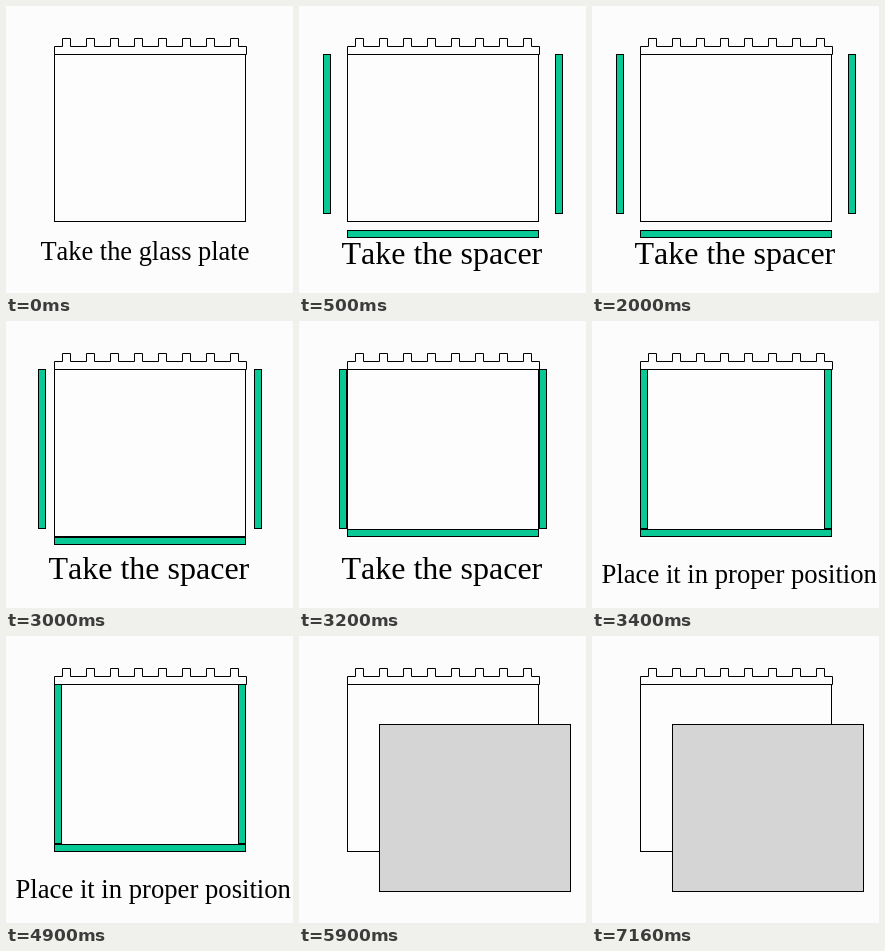
Animation of 287x287 px, one loop 8 s. Source, as an HTML page with a canvas:

```html
<!DOCTYPE html>
<html lang="en">
<head>
<meta charset="utf-8">
<title>Assembling the glass plates</title>
<style>
  html, body { margin: 0; width: 100%; height: 100%; overflow: hidden; background: #fcfcfc; }
  canvas { display: block; width: 287px; height: 287px; }
</style>
</head>
<body>
<canvas id="stage" width="287" height="287"></canvas>
<script>
const ctx = document.getElementById('stage').getContext('2d');
const LOOP = 8000;
const PAPER = '#fcfcfc', GLASS = '#fdfdfd', GREEN = '#08c896', GREY = '#d5d5d5';

const captions = {
  plate: { text: 'Take the glass plate', x: 34.5, y: 254, size: 26.4 },
  spacer: { text: 'Take the spacer', x: 42.5, y: 258, size: 32 },
  place: { text: 'Place it in proper position', x: 9.5, y: 262, size: 26.67 }
};

// gap: distance of the side spacers from their seat; drop: the same for the bottom one
const steps = [
  { until: 500, caption: captions.plate },
  { until: 3000, caption: captions.spacer, gap: 24, drop: 16 },
  { until: 3200, caption: captions.spacer, gap: 16, drop: 8 },
  { until: 3400, caption: captions.spacer, gap: 8, drop: 0 },
  { until: 5900, caption: captions.place, gap: 0, drop: 0 },
  { until: LOOP, cover: true }
];

// Outlined box with crisp one-pixel edges
function box(x, y, w, h, fill) {
  ctx.fillStyle = fill;
  ctx.fillRect(x, y, w, h);
  ctx.strokeRect(x + 0.5, y + 0.5, w - 1, h - 1);
}

function drawPlate() {
  box(48, 48, 192, 168, GLASS);
  ctx.beginPath();
  ctx.moveTo(48.5, 48.5);
  ctx.lineTo(48.5, 40.5);
  for (let x = 56.5; x < 230; x += 24) {
    ctx.lineTo(x, 40.5);
    ctx.lineTo(x, 32.5);
    ctx.lineTo(x + 8, 32.5);
    ctx.lineTo(x + 8, 40.5);
  }
  ctx.lineTo(240.5, 40.5);
  ctx.lineTo(240.5, 48.5);
  ctx.closePath();
  ctx.fillStyle = GLASS;
  ctx.fill();
  ctx.stroke();
}

function drawSpacers(gap, drop) {
  box(48 - gap, 48, 8, 160, GREEN);
  box(232 + gap, 48, 8, 160, GREEN);
  box(48, 208 + drop, 192, 8, GREEN);
}

function drawCaption({ text, x, y, size }) {
  ctx.font = `${size}px "Liberation Serif", "Times New Roman", serif`;
  ctx.fontKerning = 'none';
  ctx.fillStyle = '#000';
  ctx.fillText(text, x, y);
}

function draw(time) {
  const step = steps.find(s => time < s.until);
  ctx.fillStyle = PAPER;
  ctx.fillRect(0, 0, 287, 287);
  ctx.strokeStyle = '#000';
  ctx.lineWidth = 1;
  drawPlate();
  if (step.gap !== undefined) drawSpacers(step.gap, step.drop);
  if (step.cover) box(80, 88, 192, 168, GREY);
  if (step.caption) drawCaption(step.caption);
}

const start = performance.now();
function tick() {
  draw((performance.now() - start) % LOOP);
  requestAnimationFrame(tick);
}
tick();
</script>
</body>
</html>
```
